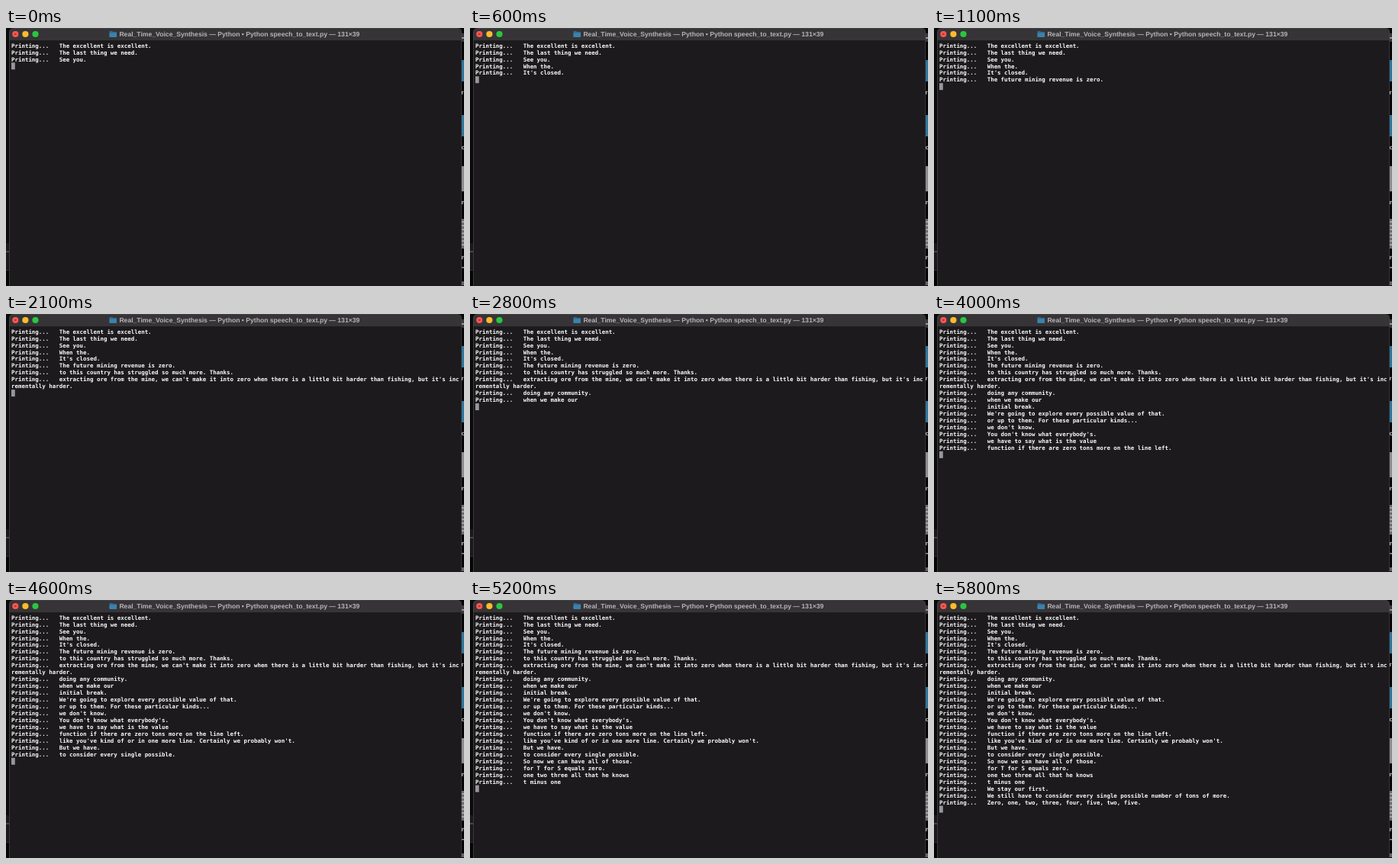
Recreate the animation shown at these times as an HTML page. Size 600 px wide and 338 px high, loop 5.9 s.

```html
<!DOCTYPE html>
<html lang="en">
<head>
<meta charset="utf-8">
<title>Terminal transcript</title>
<style>
  html, body { margin: 0; width: 100%; height: 100%; overflow: hidden; background: #050505; }
  svg { display: block; width: 100vw; height: 100vh; }
  text { white-space: pre; text-rendering: geometricPrecision; }
  .title { font: bold 8.62px "Liberation Sans", Arial, sans-serif; fill: #b6b4b6; }
  .row { font: bold 7.44px "DejaVu Sans Mono", Menlo, monospace; fill: #fafafa; }
  .label { font: bold 8px "Liberation Sans", Arial, sans-serif; fill: #c4c4c4; }
</style>
</head>
<body>
<svg viewBox="0 0 600 338" preserveAspectRatio="none">
  <rect width="600" height="338" fill="#050505"/>

  <!-- desktop behind the window -->
  <g>
    <rect width="5" height="282" fill="#0b0a0b"/>
    <rect y="282" width="5" height="36" fill="#19181a"/>
    <rect y="292.5" width="4" height="1" fill="#777"/>
    <rect y="317" width="5" height="1" fill="#2c2c2c"/>
  </g>
  <g id="desktop">
    <rect x="597" y="7" width="3" height="11" fill="#3a3a3a"/>
    <rect x="597" y="12" width="3" height="2" fill="#999"/>
    <rect x="597" y="42" width="3" height="28" fill="#31769c"/>
    <rect x="597" y="114" width="3" height="28" fill="#31769c"/>
    <rect x="597" y="181" width="3" height="33" fill="#8e8e8e"/>
    <rect x="597" y="250" width="3" height="39" fill="#6c6c6c"/>
    <rect x="597" y="313" width="3" height="1.5" fill="#999"/>
    <rect x="597" y="332" width="3" height="5" fill="#666"/>
  </g>

  <!-- window -->
  <path d="M4 338V6Q4 0 10 0H591Q597 0 597 6V338Z" fill="#4b494c"/>
  <path d="M4.7 338V17H596.4V338Z" fill="#1c1a1c"/>
  <path d="M4.7 17V6Q4.7 .6 10 .6H591Q596.4 .6 596.4 6V17Z" fill="#363437"/>
  <rect x="4.7" y="16.4" width="591.7" height=".8" fill="#141214"/>
  <circle cx="12.3" cy="8" r="4.1" fill="#fc5650"/>
  <path d="M11.2 6.900l2.2 2.200m0-2.200l-2.200 2.200" stroke="#8d1d18" stroke-width=".8"/>
  <circle cx="25.400" cy="8" r="4.1" fill="#fdbb2d"/>
  <circle cx="38.500" cy="8" r="4.1" fill="#29c740"/>
  <path d="M135.500 5q0-1 1-1h2.600l1.100 1.100h3.800q1 0 1 1V11q0 1-1 1h-7.500q-1 0-1-1Z" fill="#2f6d92"/>
  <path d="M135.500 6.500h9.500V11q0 1-1 1h-7.500q-1 0-1-1Z" fill="#3c82ab"/>
  <text class="title" x="148.4" y="11.1">Real_Time_Voice_Synthesis — Python • Python speech_to_text.py — 131×39</text>

  <g id="rows"></g>
  <rect id="cursor" x="7" width="4.8" height="9" fill="#98969a"/>
</svg>
<script>
const LOOP = 5900, COLS = 131, PITCH = 8.97, LEFT = 7, BASE = 25.6;

// [arrival in ms, spoken phrase]
const phrases = [
  [0, "The excellent is excellent."],
  [0, "The last thing we need."],
  [0, "See you."],
  [100, "When the."],
  [500, "It's closed."],
  [800, "The future mining revenue is zero."],
  [1800, "to this country has struggled so much more. Thanks."],
  [2100, "extracting ore from the mine, we can't make it into zero when there is a little bit harder than fishing, but it's incrementally harder."],
  [2600, "doing any community."],
  [2700, "when we make our"],
  [2900, "initial break."],
  [3000, "We're going to explore every possible value of that."],
  [3200, "or up to them. For these particular kinds..."],
  [3300, "we don't know."],
  [3600, "You don't know what everybody's."],
  [3800, "we have to say what is the value"],
  [4000, "function if there are zero tons more on the line left."],
  [4200, "like you've kind of or in one more line. Certainly we probably won't."],
  [4300, "But we have."],
  [4600, "to consider every single possible."],
  [4700, "So now we can have all of those."],
  [4900, "for T for S equals zero."],
  [5000, "one two three all that he knows"],
  [5200, "t minus one"],
  [5300, "We stay our first."],
  [5600, "We still have to consider every single possible number of tons of more."],
  [5700, "Zero, one, two, three, four, five, two, five."]
];

const NS = "http://www.w3.org/2000/svg";
const byId = id => document.getElementById(id);

function add(parent, tag, attrs, text = "") {
  const el = document.createElementNS(NS, tag);
  for (const key in attrs) el.setAttribute(key, attrs[key]);
  el.textContent = text;
  parent.appendChild(el);
  return el;
}

// Icon labels and the lines of a document peeking out on the right
[["r", 87], ["o", 159], ["n", 231], ["n", 303]].forEach(([ch, y]) =>
  add(byId("desktop"), "text", { class: "label", x: 596.5, y }, ch));
for (let y = 253; y < 288; y += 5)
  add(byId("desktop"), "rect", { x: 597, y, width: 3, height: 2, fill: "#a4a4a4" });

// Wrap each phrase at the terminal width
const rows = [];
for (const [at, phrase] of phrases) {
  const line = "Printing...   " + phrase;
  for (let i = 0; i < line.length; i += COLS) {
    const y = BASE + rows.length * PITCH;
    const el = add(byId("rows"), "text", { class: "row", x: LEFT, y }, line.slice(i, i + COLS));
    rows.push({ at, el });
  }
}

function draw(t) {
  let shown = 0;
  for (const { at, el } of rows) {
    const on = t >= at;
    el.style.display = on ? "" : "none";
    if (on) shown++;
  }
  byId("cursor").setAttribute("y", 18.4 + shown * PITCH);
}

function tick() {
  draw(performance.now() % LOOP);
  requestAnimationFrame(tick);
}
tick();
</script>
</body>
</html>
```
